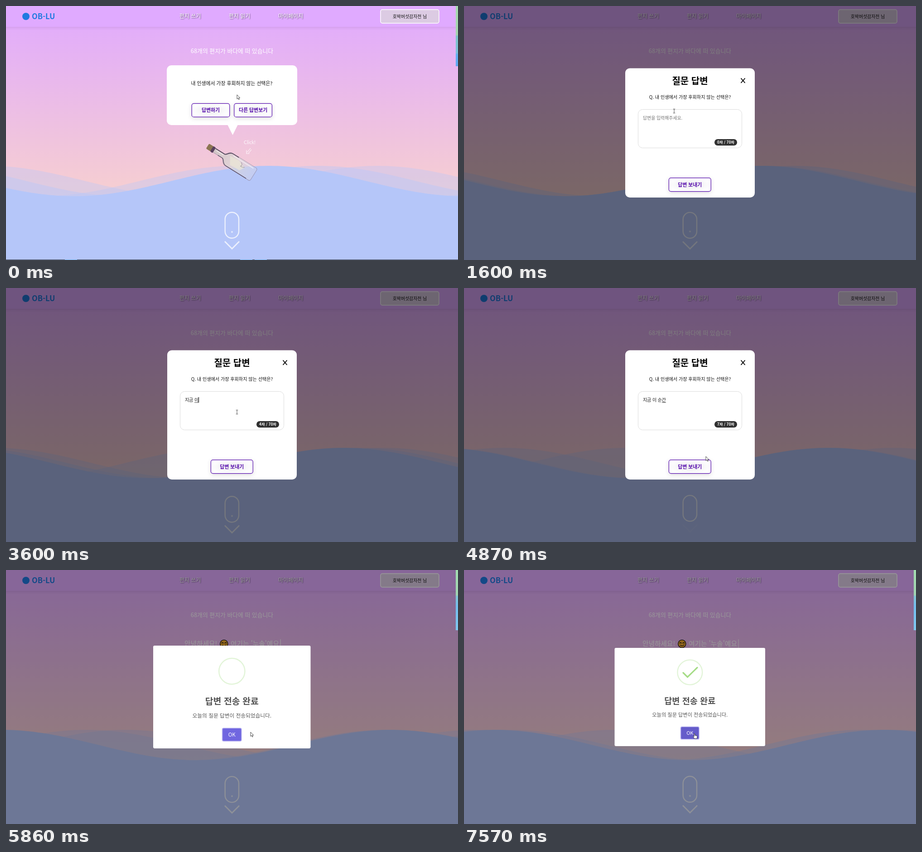
Animation, 998 px wide and 561 px high, one loop 7630 ms. Source, as an HTML page:

```html
<!DOCTYPE html>
<html lang="ko">
<head>
<meta charset="utf-8">
<title>바다에 띄운 편지</title>
<style>
  html, body { margin: 0; width: 100%; height: 100%; overflow: hidden; background: #e0aaff; }
  svg { display: block; width: 100vw; height: 100vh; }
  text { font-family: "Noto Sans CJK KR", "Noto Sans CJK", "Noto Sans KR", sans-serif; white-space: pre; }
  .nav { filter: drop-shadow(1px 1px 0.8px rgba(40, 30, 50, .8)); }
  .head { filter: drop-shadow(0 2px 3px rgba(60, 20, 90, .1)); }
  .btn { filter: drop-shadow(0 3px 5px rgba(0, 0, 0, .12)); }
</style>
</head>
<body>
<svg id="stage" viewBox="0 0 998 561" preserveAspectRatio="none">
  <defs>
    <linearGradient id="sky" x1="0" y1="0" x2="0" y2="1">
      <stop offset="0" stop-color="#e0a9ff"/><stop offset="1" stop-color="#fedcc0"/>
    </linearGradient>
    <linearGradient id="thumbA" x1="0" y1="0" x2="0" y2="1">
      <stop offset="0" stop-color="#a5d9b0"/><stop offset=".48" stop-color="#a5d3ae"/>
      <stop offset=".5" stop-color="#7fc4c8"/><stop offset=".78" stop-color="#7dbfdc"/>
      <stop offset=".8" stop-color="#64b0f0"/><stop offset="1" stop-color="#5fa8f2"/>
    </linearGradient>
    <linearGradient id="thumbB" x1="0" y1="0" x2="0" y2="1">
      <stop offset="0" stop-color="#a2dcb0"/><stop offset=".42" stop-color="#a0d2b0"/>
      <stop offset=".43" stop-color="#84c4d2"/><stop offset=".6" stop-color="#74bdec"/>
      <stop offset="1" stop-color="#7fc8f0"/>
    </linearGradient>
    <radialGradient id="soft">
      <stop offset="0" stop-color="#ececee"/><stop offset="1" stop-color="#fdfdfe"/>
    </radialGradient>
    <radialGradient id="hover">
      <stop offset="0" stop-color="#cacacb"/><stop offset="1" stop-color="#ebebee"/>
    </radialGradient>
    <linearGradient id="glass">
      <stop offset="0" stop-color="#cbc4c2" stop-opacity=".85"/>
      <stop offset=".5" stop-color="#dcd6d6" stop-opacity=".75"/>
      <stop offset="1" stop-color="#cfd2ec" stop-opacity=".55"/>
    </linearGradient>
  </defs>
</svg>
<script>
const LOOP = 7630, OPEN = 1340, DONE = 5712;
const PURPLE = '#560bad';
const stage = document.getElementById('stage');

function el(parent, tag, attrs = {}) {
  const node = document.createElementNS('http://www.w3.org/2000/svg', tag);
  set(node, attrs);
  return parent.appendChild(node);
}
function set(node, attrs) {
  for (const k in attrs) node.setAttribute(k, attrs[k]);
}
const group = (parent, attrs) => el(parent, 'g', attrs);
const path = (parent, d, attrs) => el(parent, 'path', { d, fill: 'none', ...attrs });
const rect = (parent, x, y, width, height, attrs) =>
  el(parent, 'rect', { x, y, width, height, ...attrs });
// y is the visual middle of the line
function label(parent, x, y, size, str, attrs) {
  const node = el(parent, 'text', {
    x, y: y + size * .37, 'font-size': size, 'text-anchor': 'middle', ...attrs });
  node.textContent = str;
  return node;
}
function button(parent, x, y, w, h, str) {
  const box = rect(parent, x + .6, y + .6, w - 1.2, h - 1.2,
    { rx: 4.5, fill: 'url(#soft)', stroke: PURPLE, 'stroke-width': 1.2, class: 'btn' });
  label(parent, x + w / 2, y + h / 2, 10.9, str, { fill: PURPLE, 'font-weight': 600 });
  return box;
}
const show = (node, on) => node.style.display = on ? '' : 'none';

// Sky and sea
rect(stage, 0, 0, 998, 561, { fill: 'url(#sky)' });
const waves = [
  { at: 820, speed: -95, alpha: .35 },
  { at: 510, speed: 90, alpha: .35 },
  { at: 690, speed: 25, alpha: .4 },
  { at: 580, speed: 46, alpha: 1 }
].map(w => ({ ...w, node: path(stage, '', { fill: '#b5c6f9', 'fill-opacity': w.alpha }) }));

function waveShape(crest) {
  let d = 'M0 561';
  for (let x = 0; x <= 1000; x += 8)
    d += `L${x} ${(386.5 - 33.5 * Math.cos((x - crest) / 860 * 2 * Math.PI)).toFixed(2)}`;
  return d + 'V561Z';
}

// Header
rect(stage, -10, -10, 1018, 56, { fill: '#e0aaff', class: 'head' });
el(stage, 'circle', { cx: 44, cy: 23, r: 8, fill: '#1f7ae0' });
label(stage, 57, 23, 16.5, 'OB-LU', { 'text-anchor': 'start', fill: '#1f7ae0', 'font-weight': 700 });
[[406.5, '편지 쓰기'], [515.5, '편지 읽기'], [628.5, '마이페이지']].forEach(([x, s]) =>
  label(stage, x, 23, 12, s, { fill: '#fff', 'font-weight': 500, class: 'nav' }));
rect(stage, 827, 8, 129, 30, { rx: 4, fill: '#dccbe3', stroke: '#fff', 'stroke-width': 1.5 });
label(stage, 891.5, 23, 9.9, '호박버섯감자전 님', { fill: '#111', 'font-weight': 500 });

label(stage, 499, 99, 12.85, '68개의 편지가 바다에 떠 있습니다', { fill: '#fff', 'font-weight': 500 });

// Question balloon
const balloon = group(stage);
rect(balloon, 355, 131, 288, 132, { rx: 10, fill: '#fff' });
path(balloon, 'M489 262H512L500.5 285Z', { fill: '#fff' });
label(balloon, 498.5, 171, 10.85, '내 인생에서 가장 후회하지 않는 선택은?', { fill: '#111', 'font-weight': 500 });
const answerBtn = button(balloon, 409.6, 214.8, 84.8, 31, '답변하기');
button(balloon, 503.2, 214.8, 84.8, 31, '다른 답변보기');

// Greeting line
const greeting = group(stage);
const white = { fill: '#fff', 'font-weight': 500, 'text-anchor': 'start' };
label(greeting, 394, 163, 14.7, '안녕하세요!', white);
label(greeting, 496, 163, 14.7, "여기는 '누솔'예요", white);
el(greeting, 'circle', { cx: 481.3, cy: 163, r: 8.6, fill: '#f2a92e', stroke: '#111', 'stroke-width': 1.3 });
path(greeting, 'M476 161.5q2 -2 4 0M483 161.5q2 -2 4 0M477.5 166q5 3.5 8.5 -1',
  { stroke: '#111', 'stroke-width': 1.2, 'stroke-linecap': 'round' });
const greetCaret = rect(greeting, 605.5, 153, 1.2, 19, { fill: '#fff' });

// Bottle
const float = group(stage);
const bottle = group(float, { transform: 'translate(445 309.5) rotate(32)' });
path(bottle, 'M16 -5H40C46 -6 46 -16 56 -16H116Q120 -16 120 -12V12Q120 16 116 16H56C46 16 46 6 40 5H16Z',
  { fill: 'url(#glass)', stroke: '#85798f', 'stroke-opacity': .6 });
path(bottle, 'M18 -5H42C47 -6 48 -15.5 57 -15.5H72', { stroke: '#4f4057', 'stroke-width': 1.6 });
path(bottle, 'M30 5H42C47 6 48 15.5 57 15.5H110', { stroke: '#5c4f66', 'stroke-width': 1.4 });
path(bottle, 'M54 -8L76 -10 94 -2 88 8 64 9Z', { fill: '#e9e5d6', 'fill-opacity': .75 });
path(bottle, 'M82 -9q7 3 3 8q6 1 9 -3', { stroke: '#857a88', 'stroke-opacity': .7 });
path(bottle, 'M22 -2H40M60 -12H112', { stroke: '#fff', 'stroke-opacity': .7, 'stroke-width': 1.4 });
rect(bottle, 0, -6.5, 13, 13, { rx: 2, fill: '#8c7552' });
rect(bottle, 11, -7, 6.5, 14, { rx: 2, fill: '#59405f' });
label(float, 538, 301, 10.8, 'Click!',
  { fill: '#fff', 'fill-opacity': .85, style: 'font-family:Lato,sans-serif' });
path(float, 'M540 314L532.5 323M542 317L535.5 325M531 318.5V326H537.5',
  { stroke: '#fff', 'stroke-opacity': .85, 'stroke-width': 1.1 });

// Scroll hint
const mouse = group(stage, { stroke: '#fff', opacity: .75, 'stroke-width': 2.4 });
rect(mouse, 483.7, 455.7, 30.3, 57, { rx: 15.1, fill: 'none' });
const chevron = path(mouse, 'M483 520L499 536L515 520', { 'stroke-width': 2.8 });
const dot = el(mouse, 'circle', { cx: 499, r: 2, fill: '#fff', stroke: 'none' });

const edge = group(stage);
rect(edge, 0, 560, 998, 1, { fill: '#3b4354' });
[[130, 27], [517, 27], [549, 27]].forEach(([x, w]) => rect(edge, x, 560, w, 1, { fill: '#78b7ee' }));

const dim = rect(stage, 0, 0, 998, 561);
const thumb = rect(stage, 993, 0, 5, 133);

// Answer dialog
const dialog = group(stage);
rect(dialog, 356, 137.5, 286, 285.5, { rx: 10, fill: '#fff' });
label(dialog, 499, 166, 20, '질문 답변', { fill: '#000', 'font-weight': 700 });
path(dialog, 'M611.5 159.5L620.5 170M620.5 159.5L611.5 170', { stroke: '#000', 'stroke-width': 1.8 });
label(dialog, 499, 201, 10.1, 'Q. 내 인생에서 가장 후회하지 않는 선택은?', { fill: '#111', 'font-weight': 500 });
rect(dialog, 384.5, 228.5, 229, 85, { rx: 10, fill: '#fff', stroke: '#dcdcdc' });
const field = label(dialog, 395, 247, 9.9, '', { 'text-anchor': 'start' });
const underline = rect(dialog, 0, 252.5, 9, .8, { fill: '#222' });
const caret = rect(dialog, 0, 241, 1, 12, { fill: '#000' });
rect(dialog, 553, 294, 50, 14.3, { rx: 7.1, fill: '#303030' });
const counter = label(dialog, 578, 301.2, 8.3, '', { fill: '#fff', 'font-weight': 700 });
const sendBtn = button(dialog, 451.8, 379, 94, 31.2, '답변 보내기');

// Confirmation popup
const popup = group(stage);
rect(popup, 332.5, 172, 332.5, 217, { rx: 3, fill: '#fff' });
el(popup, 'circle', { cx: 498.8, cy: 226, r: 27.4, fill: 'none', stroke: '#a5dc86', 'stroke-opacity': .32, 'stroke-width': 2.4 });
const check = path(popup, 'M484 227L493.5 236.5L515 215.5',
  { stroke: '#a5dc86', 'stroke-width': 3.2, 'stroke-linecap': 'round', pathLength: 100, 'stroke-dasharray': '100 200' });
label(popup, 498.8, 289, 18.6, '답변 전송 완료', { fill: '#545454', 'font-weight': 600 });
label(popup, 498.8, 320, 11.2, '오늘의 질문 답변이 전송되었습니다.', { fill: '#545454' });
rect(popup, 477.7, 345.5, 42, 29, { rx: 3.6, fill: '#b8b3f0' });
const okBtn = rect(popup, 479.3, 347, 39, 26, { rx: 2.2 });
label(popup, 498.8, 360.2, 11, 'OK', { fill: '#fff', 'font-weight': 500 });

// Pointer shapes
const pointer = group(stage, { stroke: '#222', 'stroke-width': .8, 'stroke-linejoin': 'round', fill: '#fff' });
const shapes = {
  arrow: path(pointer, 'M0 0V9.4L2.2 7.4 3.8 10.8 5.3 10.1 3.8 6.9H6.6Z', { fill: '#fff' }),
  beam: path(pointer, 'M-2.2 -4.5H-.6L0 -4 .6 -4.5H2.2M0 -4V4M-2.2 4.5H-.6L0 4 .6 4.5H2.2', {}),
  hand: path(pointer, 'M-.9 .6Q0 -.8 .9 .6V4.2L5.2 5.2Q6 5.5 6 6.5L5.2 11.5H.2L-3.2 7.2Q-3 5.6 -.9 7Z', { fill: '#fff' })
};
const route = [
  [0, 510, 196], [250, 510, 196], [800, 464, 232], [2250, 464, 232], [2450, 480, 249],
  [2650, 503, 284], [3300, 503, 284], [3600, 510, 274], [4100, 549, 294], [4400, 549, 353],
  [4870, 534, 372], [5100, 528, 388], [5650, 528, 388], [5860, 540, 358], [6700, 540, 358],
  [7100, 523, 360], [7400, 509, 361], [LOOP, 509, 361]
];
const typing = [
  [2600, 'ㅈ'], [2730, '지'], [2870, '지ㄱ'], [3000, '지그'], [3130, '지금'], [3270, '지금 '],
  [3400, '지금 ㅇ'], [3530, '지금 이'], [3800, '지금 이 '], [4000, '지금 이 ㅅ'], [4130, '지금 이 수'],
  [4250, '지금 이 순'], [4400, '지금 이 순ㄱ'], [4520, '지금 이 순가'], [4650, '지금 이 순간']
];

const smooth = k => k * k * (3 - 2 * k);
const clamp = v => Math.max(0, Math.min(1, v));
const bob = (t, period) => Math.sin(Math.PI * t / period) ** 2;
const inside = (p, x, y, w, h) => p[0] >= x && p[0] <= x + w && p[1] >= y && p[1] <= y + h;

function along(table, t) {
  let i = 1;
  while (i < table.length - 1 && table[i][0] < t) i++;
  const [a, b] = [table[i - 1], table[i]];
  const k = smooth(clamp((t - a[0]) / (b[0] - a[0])));
  return a.slice(1).map((v, n) => v + (b[n + 1] - v) * k);
}

function drawField(t) {
  const step = typing.filter(s => s[0] <= t).pop();
  const str = step ? step[1] : '';
  field.textContent = str || '답변을 입력해주세요.';
  set(field, { fill: str ? '#111' : '#757575' });
  counter.textContent = `${str.length}자 / 70자`;
  const end = 395 + (str ? field.getComputedTextLength() : 0);
  set(caret, { x: end });
  set(underline, { x: end - 9 });
  show(caret, t > 2350 && t < 4800 && (t - 2350) % 1000 < 650 || t > 3530 && t < 3720);
  show(underline, str && !str.endsWith(' '));
}

function render(t) {
  const asking = t < OPEN, writing = !asking && t < DONE, sent = t >= DONE;
  waves.forEach(w => set(w.node, { d: waveShape(w.at + w.speed * t / 1000) }));
  set(float, { transform: `translate(0 ${9.3 * bob(t, 2500)})` });

  const glow = clamp(1.6 * Math.sin(Math.PI * (t / 750 - .41)) ** 2);
  set(mouse, { transform: `translate(0 ${5 * bob(t, 1500)})` });
  set(chevron, { opacity: glow });
  set(dot, { cy: 499 - 18 * (1 - glow), opacity: glow * .8 });

  show(balloon, asking);
  show(greeting, sent);
  show(dialog, writing);
  show(popup, sent);
  show(edge, t < 135);
  show(thumb, !writing);
  set(thumb, { fill: sent ? 'url(#thumbB)' : 'url(#thumbA)' });
  set(dim, { 'fill-opacity': asking ? 0 : writing ? .5 : .4 });

  const p = along(route, t);
  const onAnswer = asking && inside(p, 410, 215, 84, 31);
  const onSend = writing && inside(p, 452, 379, 94, 31);
  const onOk = sent && inside(p, 479, 347, 39, 26);
  const onField = writing && inside(p, 384, 228, 230, 86);
  const kind = onAnswer || onSend || onOk ? 'hand' : onField ? 'beam' : 'arrow';
  for (const k in shapes) show(shapes[k], k === kind);
  set(pointer, { transform: `translate(${p})` });
  set(answerBtn, { fill: onAnswer ? 'url(#hover)' : 'url(#soft)' });
  set(sendBtn, { fill: onSend ? 'url(#hover)' : 'url(#soft)' });
  set(okBtn, { fill: onOk ? '#655cca' : '#7066e0' });

  if (writing) drawField(t);
  if (sent) {
    const age = t - DONE;
    const [scale] = along([[0, .7], [135, 1.05], [240, .95], [300, 1]], age);
    set(popup, { transform: `translate(498.8 280.5) scale(${scale}) translate(-498.8 -280.5)` });
    const drawn = clamp((age - 400) / 300);
    show(check, drawn > 0);
    set(check, { 'stroke-dashoffset': 100 * (1 - smooth(drawn)) });
    set(greetCaret, { opacity: .1 + .9 * bob(age + 260, 800) });
  }
}

function tick() {
  render(performance.now() % LOOP);
  requestAnimationFrame(tick);
}
tick();
</script>
</body>
</html>
```
